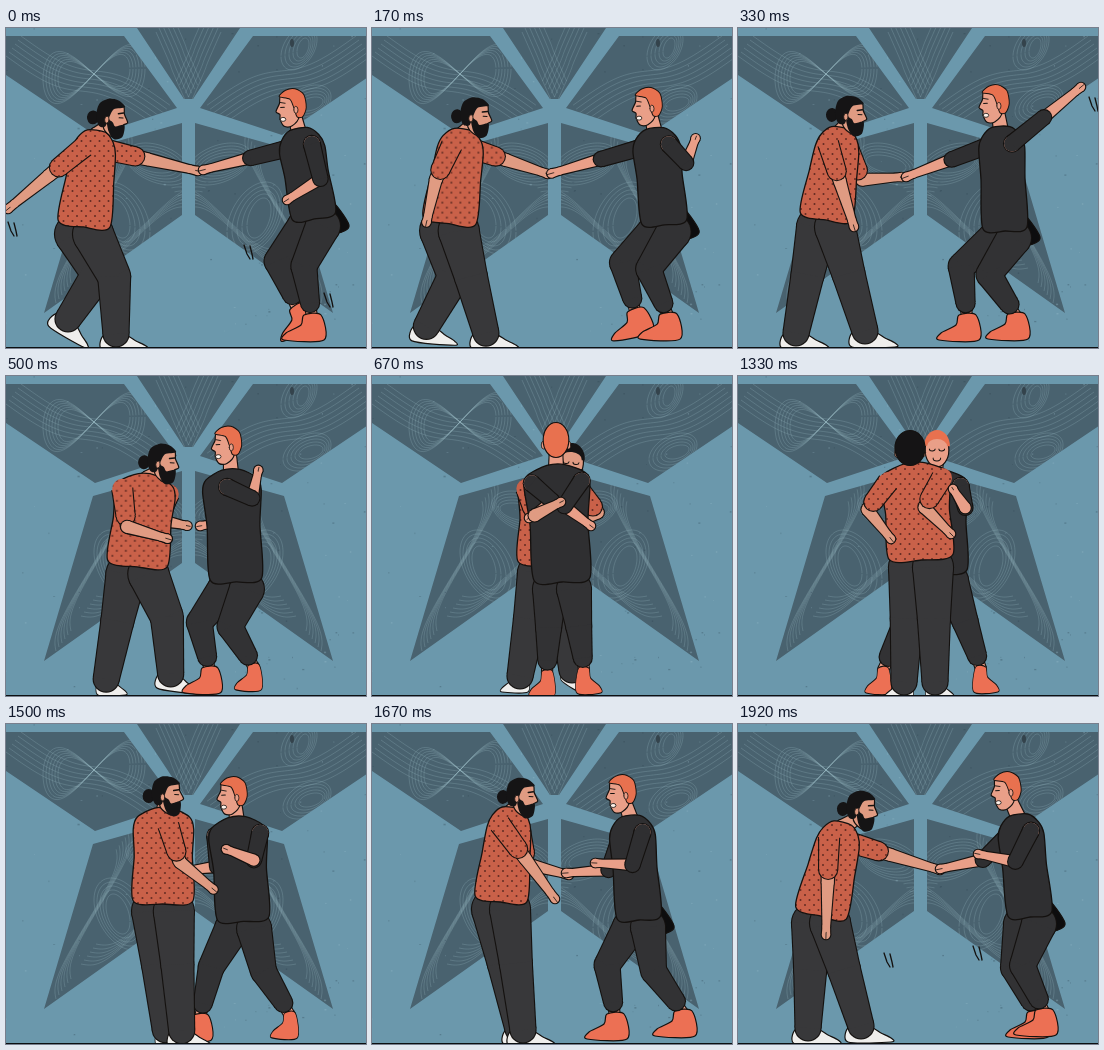
These frames come from a looping animation (360 px wide and 320 px high, 2010 ms). An HTML page with a canvas:

```html
<!DOCTYPE html>
<html lang="en">
<head>
<meta charset="utf-8">
<title>Dancing couple</title>
<style>
html, body { margin: 0; width: 100%; height: 100%; overflow: hidden; background: #6b98ac; }
canvas { display: block; width: 360px; height: 320px; }
</style>
</head>
<body>
<canvas id="stage" width="360" height="320"></canvas>
<script>
const W = 360, H = 320, LOOP = 2010, FPS = 12, LAST = 23, BEAT = 4;
const INK = '#14110f', HAIR = '#151415', GINGER = '#e8714f';
const stage = document.getElementById('stage').getContext('2d');
let g = stage;

// A pose is a few joints per beat; everything else follows from them.
// size: half widths of shoulder, waist and hem seen from the side, and what a front view adds.
const man = {
  skin: '#e09b82', trouser: '#38383a', cloth: makeShirt(), shoe: '#efeeec',
  size: [[20, 13], [24, 8], [26, 6]], turn: [0, 0, 1, 2, 3, 4, 4],
  arm: [8, 6, 3.8], sleeve: [.72, 10], thigh: 47, shin: 58, leg: [20, 16, 12.5], cuff: 1,
  floor: 304, foot: [-12, 1, 9, 1, 20, 7, 30, 12, 30, 16, -13, 16],
  joints: {
    head: [105, 90, 112, 87, 199, 86, 196, 76, 172, 72, 149, 73, 123, 86],
    neck: [90, 106, 102, 103, 182, 100, 209, 96, 176, 90, 139, 87, 104, 102],
    hip: [78, 196, 88, 189, 178, 187, 214, 183, 183, 181, 129, 175, 83, 189],
    handA: [2, 181, 116, 199, 189, 126, 156, 139, 213, 158, 183, 175, 88, 211],
    handB: [192, 143, 164, 149, 200, 150, 180, 151, 153, 163, 197, 151, 202, 146],
    footL: [62, 291, 58, 305, 148, 300, 189, 305, 166, 306, 146, 305, 70, 304],
    footR: [110, 306, 127, 303, 200, 294, 198, 301, 197, 306, 151, 306, 123, 302]
  }
};
const woman = {
  skin: '#e99f88', trouser: '#323234', cloth: '#2f2f31', shoe: '#ec7054',
  size: [[21, 10], [22, 7], [22, 6]], turn: [2, 2, 3, 4, 5, 6, 6], tail: true,
  arm: [8, 5.5, 3.6], sleeve: [1, 8], thigh: 44, shin: 50, leg: [17, 12.5, 9], cuff: .76,
  floor: 290, foot: [-9, 0, 8, 0, 11, 10, 26, 18, 28, 25, -12, 25],
  joints: {
    head: [286, 80, 257, 76, 184, 64, 140, 69, 199, 73, 250, 70, 269, 67],
    neck: [293, 104, 263, 102, 184, 92, 129, 94, 197, 97, 259, 95, 281, 94],
    hip: [308, 188, 267, 200, 190, 203, 125, 192, 201, 195, 267, 193, 292, 190],
    handA: [197, 142, 168, 149, 219, 150, 182, 149, 165, 145, 194, 149, 202, 145],
    handB: [281, 172, 343, 59, 157, 142, 181, 135, 215, 113, 223, 139, 240, 130],
    footL: [291, 278, 229, 287, 175, 295, 87, 291, 145, 292, 243, 290, 298, 288],
    footR: [306, 287, 278, 286, 212, 292, 142, 293, 243, 291, 311, 287, 306, 286]
  }
};

// Where swing strokes flash, by step.
const swings = { 0: [[2, 194], [238, 217], [318, 265]], 4: [[351, 69]], 23: [[146, 229], [235, 222]] };

function makeShirt() {
  const c = document.createElement('canvas'), q = c.getContext('2d');
  c.width = 9; c.height = 10;
  q.fillStyle = '#c96149';
  q.fillRect(0, 0, 9, 10);
  q.fillStyle = '#622c23';
  for (const [x, y] of [[2, 2], [6.5, 7]]) {
    q.beginPath();
    q.arc(x, y, 1, 0, 7);
    q.fill();
  }
  return stage.createPattern(c, 'repeat');
}

const add = (p, x, y) => [p[0] + x, p[1] + y];
const lerp = (p, q, u) => [p[0] + (q[0] - p[0]) * u, p[1] + (q[1] - p[1]) * u];
const pairs = a => a.flatMap((v, i) => i % 2 ? [] : [[v, a[i + 1]]]);

function paint(fill, line = 1.2) {
  if (fill) { g.fillStyle = fill; g.fill(); }
  if (line) { g.strokeStyle = INK; g.lineWidth = line; g.stroke(); }
}

// Rounded closed curve through the points.
function blob(p, fill, line = 1.2) {
  const n = p.length, k = .14, at = i => p[(i + n) % n];
  g.beginPath();
  g.moveTo(...p[0]);
  for (let i = 0; i < n; i++) {
    const [a, b, c, d] = [at(i - 1), at(i), at(i + 1), at(i + 2)];
    g.bezierCurveTo(b[0] + (c[0] - a[0]) * k, b[1] + (c[1] - a[1]) * k,
      c[0] - (d[0] - b[0]) * k, c[1] - (d[1] - b[1]) * k, ...c);
  }
  paint(fill, line);
}

function oval(x, y, rx, ry, fill, line = 0, from = 0, to = 7) {
  g.beginPath();
  g.ellipse(x, y, rx, ry, 0, from, to);
  paint(fill, line);
}

function stroke(width, ...p) {
  g.beginPath();
  p.forEach(q => g.lineTo(...q));
  paint(null, width);
}

// Tapered chain with one outline; an open root melts into the body.
function limb(p, radii, fill, open) {
  for (const [grow, color] of [[1.1, INK], [0, fill]]) {
    g.fillStyle = color;
    p.forEach(([x, y], i) => {
      const r = radii[i] + grow;
      if (i || !open || !grow) {
        g.beginPath();
        g.arc(x, y, r, 0, 7);
        g.fill();
      }
      if (!i) return;
      const [u, v] = p[i - 1], q = radii[i - 1] + grow;
      const len = Math.hypot(x - u, y - v) || 1, nx = (v - y) / len, ny = (x - u) / len;
      g.beginPath();
      g.moveTo(u + nx * q, v + ny * q);
      g.lineTo(x + nx * r, y + ny * r);
      g.lineTo(x - nx * r, y - ny * r);
      g.lineTo(u - nx * q, v - ny * q);
      g.fill();
    });
  }
}

// Smooth path through the keys, evenly spaced in pos.
function spline(keys, pos) {
  const i = Math.min(Math.floor(pos), keys.length - 2), u = pos - i;
  const b = keys[i], c = keys[i + 1], a = keys[i - 1] || b, d = keys[i + 2] || c;
  return b.map((v, j) => v + .5 * u * (c[j] - a[j] + u * (2 * a[j] - 5 * v + 4 * c[j] - d[j] + u * (3 * (v - c[j]) + d[j] - a[j]))));
}

// Middle joint of a two-bone limb: sideways offset from the straight line.
function bend(p, q, one, two, most) {
  const dx = q[0] - p[0], dy = q[1] - p[1], d = Math.hypot(dx, dy) || 1, half = (one + two) / 2;
  const off = Math.min(most, Math.sqrt(Math.max(0, half * half - d * d / 4)));
  const mid = lerp(p, q, one / (one + two));
  return [1, -1].map(s => add(mid, s * off * dy / d, -s * off * dx / d));
}

function elbowOf(p, q, c) {
  const score = e => e[1] - e[0] * c * .7;
  const [a, b] = bend(p, q, 38, 44, 22);
  return score(a) > score(b) ? a : b;
}

function poseOf(f, pos) {
  const p = {};
  for (const k in f.joints) p[k] = spline(pairs(f.joints[k]), pos);
  const angle = spline(f.turn.map(v => [v]), pos)[0] * Math.PI / 2;
  const c = p.c = Math.cos(angle), s = p.s = Math.sin(angle), front = Math.abs(s);
  const [sh, mid, hem] = f.size.map(([a, b]) => a + b * front);
  const dx = p.hip[0] - p.neck[0], dy = p.hip[1] - p.neck[1], len = Math.hypot(dx, dy);
  // Body frame: across the chest and down the spine.
  p.at = (x, y) => add(p.neck, (x * dy + y * dx) / len, (-x * dx + y * dy) / len);
  const side = n => [[9, -3], [sh - 2, 6], [sh + 2, 18], [mid, len * .5], [hem, len]].map(([x, y]) => p.at(n * x, y));
  p.torso = [...side(-1), p.at(0, len + 3), ...side(1).reverse()];
  const reach = (-.7 - s + .7 * s * s) * (sh - 6);
  for (const [k, n] of [['A', 1], ['B', -1]]) {
    const root = p.at(n * reach, 14), hand = p['hand' + k];
    p['arm' + k] = [root, elbowOf(root, hand, c), hand];
  }
  for (const [k, n] of [['L', -1], ['R', 1]]) {
    const root = add(p.hip, n * (9 + 3 * front), 10), foot = p['foot' + k];
    const [a, b] = bend(root, foot, f.thigh, f.shin, 26);
    const knees = lerp(b, a, (c + 1) / 2);
    p['leg' + k] = [root, knees, foot];
  }
  return p;
}

function arm(f, [root, elbow, hand], foreOnly) {
  const wrist = lerp(elbow, hand, .84), [a, b, c] = f.arm;
  limb(foreOnly ? [elbow, wrist, hand] : [root, elbow, wrist, hand], foreOnly ? [b, c, 4.2] : [a, b, c, 4.2], f.skin);
  stroke(.8, lerp(elbow, hand, .95), lerp(elbow, hand, 1.09));
  if (foreOnly) return;
  const [cover, r] = f.sleeve;
  limb([root, lerp(root, elbow, cover)], [r, r * .9], f.cloth, true);
}

function leg(f, p, k, n) {
  const [root, knee, foot] = p['leg' + k];
  const way = p.c + n * .6 * (1 - Math.abs(p.c)), lift = Math.max(0, f.floor - 4 - foot[1]);
  limb([knee, add(foot, 0, 2)], [5, 5], f.skin);
  g.save();
  g.translate(...foot);
  g.scale(Math.sign(way) * Math.max(.55, Math.abs(way)), 1);
  g.rotate(Math.min(.7, lift * .06));
  blob(pairs(f.foot), f.shoe);
  g.restore();
  limb([root, knee, lerp(knee, foot, f.cuff)], f.leg, f.trouser);
}

function profile(f) {
  const m = f === man;
  if (m) oval(-18, 1, 6, 7, HAIR);
  blob(pairs([-4, -12, 11, -13, 13, -5, 17, 3, 13, 6, 13, 11, 9, 18, 1, 18, -7, 9]), f.skin);
  blob(pairs([13, -12, 6, -18, -4, -19, -13, -13, -15, 0, -11, 9, -5, 9, -2, 0, 2, -9]), m ? HAIR : GINGER, m ? 0 : 1);
  if (m) blob(pairs([-4, 2, 2, 4, 5, 8, 14, 6, 13, 18, 5, 21, -1, 14]), HAIR, 0);
  else oval(10, 11, 3, 2, '#fff2ea', .8);
  oval(-4, 2, 2.2, 3.5, f.skin, .8);
  stroke(m ? 1.5 : .9, [7, -5], [12, -6]);
  stroke(1, [8, -1], [12, -1]);
}

function frontFace(f) {
  const m = f === man;
  oval(0, 1, 12.5, 17, f.skin, 1.2);
  oval(0, -3, 13.5, 16, m ? HAIR : GINGER, 0, Math.PI, 0);
  oval(0, -3, 10.5, 7, f.skin, 0);
  if (m) oval(0, 6, 13, 15, HAIR, 0, 0, Math.PI);
  for (const x of [-5, 5]) oval(x, 0, 3, 2, null, 1, 0, Math.PI);
  if (!m) oval(0, 9, 4, 3, null, 1, 0, Math.PI);
}

function backHead(f) {
  for (const x of [-13, 13]) oval(x, 5, 2.5, 4, f.skin, .8);
  oval(0, 0, f === man ? 15 : 13.5, 17.5, f === man ? HAIR : GINGER, 1.2);
}

function head(f, p) {
  const flip = Math.abs(p.c) > .5;
  limb([add(p.head, -p.c * 3, 8), add(p.neck, 0, 1)], [6, 7], f.skin);
  blob(p.torso, f.cloth, 1.3);
  g.save();
  g.translate(...p.head);
  g.rotate((p.head[0] - p.neck[0]) * .006);
  if (f === woman) g.scale(.95, 1);
  if (flip) g.scale(Math.sign(p.c), 1);
  (flip ? profile : p.s > 0 ? frontFace : backHead)(f);
  g.restore();
}

function figure(f, p) {
  const frontA = p.c > -.5, frontB = p.c < .5;
  if (!frontA) arm(f, p.armA);
  if (!frontB) arm(f, p.armB);
  if (f.tail) {
    const back = -p.c, end = add(p.hip, back * 35, 9);
    blob([add(p.hip, back * 16, -16), end, add(end, -back * 12, 8), add(p.hip, back * 8, 8)], '#0d0d0e');
  }
  leg(f, p, 'L', -1);
  leg(f, p, 'R', 1);
  head(f, p);
  if (frontA) arm(f, p.armA);
  if (frontB) arm(f, p.armB);
}

// n parallel curves, each drawn from a point function.
function ribbon(n, at) {
  for (let i = 0; i < n; i++) {
    g.beginPath();
    for (let a = 0; a < 6.3; a += .08) g.lineTo(...at(a, i));
    g.stroke();
  }
}
const loop = (x, y, rx, ry, gap) => ribbon(5, (a, i) =>
  [x + (rx + i * gap) * Math.cos(a) + i, y + (ry + i * gap) * Math.sin(a + .4)]);
const eight = (x, y, w, h) => ribbon(6, (a, i) =>
  [x + (w + i * 3) * Math.cos(a), y + (h + i * 2) * Math.sin(2 * a) - 5 * Math.cos(a)]);
const wave = (x, y, dx, dy, amp) => ribbon(6, (a, i) =>
  [x + dx * a / 6.28 + i * 3 + amp * Math.sin(a) * dy / 150, y + dy * a / 6.28 - i * 4 + amp * Math.sin(a)]);

function mirrored(draw) {
  for (const s of [1, -1]) {
    g.save();
    if (s < 0) { g.translate(365, 0); g.scale(-1, 1); }
    draw(s);
    g.restore();
  }
}

function makeScene() {
  const c = document.createElement('canvas');
  c.width = W; c.height = H;
  g = c.getContext('2d');
  let seed = 7;
  const rnd = () => (seed = seed * 16807 % 2147483647) / 2147483647;
  g.fillStyle = '#6b98ac';
  g.fillRect(0, 0, W, H);
  const star = new Path2D('M131 0H234L187 71H178Z');
  const half = new Path2D('M-6 8H118L171 80L89 107L-6 43ZM176 95V187L38 285L87 120Z');
  star.addPath(half);
  star.addPath(half, new DOMMatrix([-1, 0, 0, 1, 365, 0]));
  g.fillStyle = '#49626f';
  g.fill(star);
  g.clip(star);
  g.strokeStyle = 'rgba(160,190,200,.3)';
  g.lineWidth = .8;
  mirrored(side => {
    if (side > 0) eight(88, 46, 36, 16);
    else { loop(68, 20, 6, 10, 3); loop(60, 76, 12, 7, 3); }
    wave(0, 28, 150, 70, 9);
    wave(150, 4, 30, 70, 8);
    loop(112, 190, 12, 20, 4);
    loop(148, 136, 20, 9, 3);
    wave(50, 275, 60, -150, 12);
    wave(75, 240, 110, -60, 12);
  });
  g.restore();
  const plain = document.createElement('canvas');
  plain.width = W; plain.height = H;
  g = plain.getContext('2d');
  g.drawImage(c, 0, 0);
  for (let i = 0; i < 90; i++) {
    g.fillStyle = i % 3 ? 'rgba(40,62,74,.3)' : 'rgba(160,195,208,.3)';
    g.fillRect(rnd() * W, rnd() * H, .6 + rnd() * 1.6, .6 + rnd());
  }
  oval(286, 15, 2, 4, '#34434c');
  g = stage;
  return plain;
}
const scene = makeScene();

function render(step) {
  const lastKey = 5 * BEAT;
  const pos = step < lastKey ? step / BEAT : 5 + (step - lastKey) / (LAST - lastKey);
  const m = poseOf(man, pos), w = poseOf(woman, pos);
  g.lineJoin = g.lineCap = 'round';
  g.drawImage(scene, 0, 0);
  man.cloth.setTransform(new DOMMatrix().translate(...m.hip));
  const pair = [[man, m], [woman, w]];
  if (m.s < -.1) pair.reverse();
  pair.forEach(([f, p]) => figure(f, p));
  // The embracing forearm lies on the partner's back.
  if (m.s > .5) arm(man, m.armA, true);
  if (m.s < -.5) arm(woman, w.armB, true);
  for (const p of swings[step] || [])
    for (const n of [0, 1]) stroke(1.3, add(p, n * 6, n), add(p, 3 + n * 5, 9), add(p, 6 + n * 3, 14));
  g.fillStyle = '#0c0f11';
  g.fillRect(0, 319, W, 1);
}

const start = performance.now();
let shown = -1;
function tick() {
  const t = (performance.now() - start) % LOOP;
  const step = Math.min(LAST, Math.floor(t * FPS / 1000 + .05));
  if (step !== shown) render(shown = step);
  requestAnimationFrame(tick);
}
tick();
</script>
</body>
</html>
```
